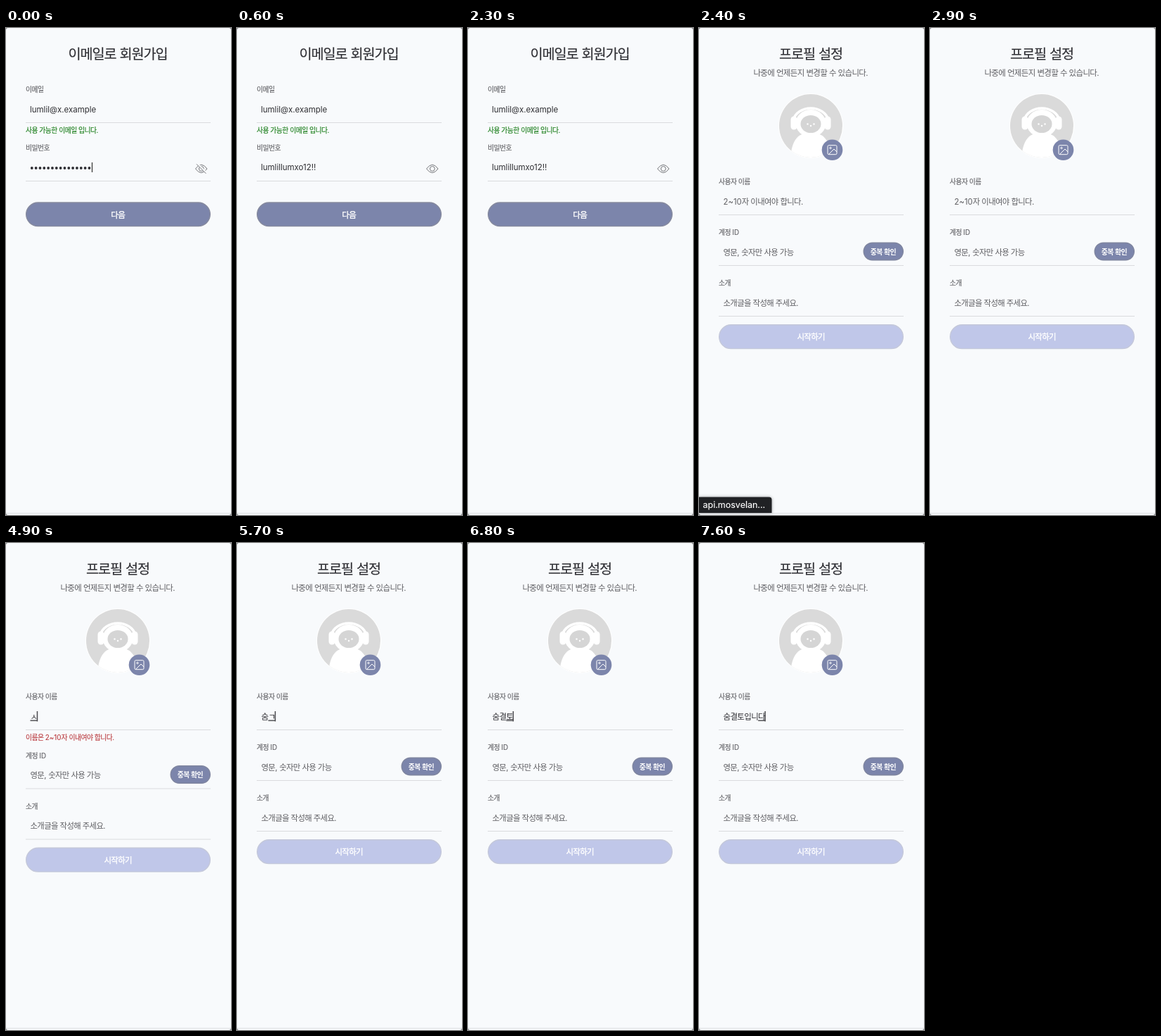
Animation of 320 by 692 pixels, one loop 8000 ms. Source, as an HTML page:

```html
<!DOCTYPE html>
<html lang="ko">
<head>
<meta charset="utf-8">
<title>회원가입</title>
<style>
html, body { margin: 0; width: 100%; height: 100%; overflow: hidden; background: #f8fafc; }
svg { display: block; width: 320px; height: 692px; }
text { font-family: Inter, "Noto Sans CJK KR", "Noto Sans CJK", sans-serif; white-space: pre; word-spacing: -.04em; }
.ko { letter-spacing: -.056em; }
.title { font-size: 19.7px; fill: #2e2e33; stroke: #2e2e33; stroke-width: .15px; text-anchor: middle; }
.body { font-size: 11.48px; fill: #2e2e32; }
.hint { font-size: 11.38px; fill: #5e5e62; }
.sub { font-size: 11.48px; fill: #5e5e62; text-anchor: middle; }
.label { font-size: 9.8px; fill: #646468; stroke: #646468; stroke-width: .15px; }
.ok { font-size: 9.84px; fill: #1c7f1c; stroke: #1c7f1c; stroke-width: .15px; }
.bad { font-size: 9.84px; fill: #b9383c; stroke: #b9383c; stroke-width: .1px; }
.btn { font-size: 11.48px; font-weight: 500; fill: #fff; stroke: #fff; stroke-width: .35px; text-anchor: middle; }
.small { font-size: 9.95px; font-weight: 700; fill: #fff; text-anchor: middle; }
.tip { font-size: 12.5px; fill: #fff; stroke: #fff; stroke-width: .15px; }
#tip { filter: drop-shadow(0 0 2px rgba(0, 0, 0, .35)); }
</style>
</head>
<body>
<svg id="stage" viewBox="0 0 320 692" xmlns="http://www.w3.org/2000/svg">
  <rect width="320" height="692" fill="#7d7f82"/>
  <rect width="320" height="692" rx="3" fill="#f8fafc"/>
  <path d="M0 689.5H320" stroke="#dcdee1"/>

  <g id="signup">
    <g id="dots" fill="#2e2e33"></g>
    <path id="pwCaret" d="M122.5 191V205" stroke="#444" stroke-width="1.4"/>
    <g fill="none" stroke="#75767a">
      <path d="M269.5 200Q277.8 188.6 286 200Q277.8 211.4 269.5 200Z"/>
      <circle cx="277.8" cy="200" r="3.4"/>
      <g id="slash">
        <path d="M272 193L285 206" stroke="#f8fafc" stroke-width="2.6"/>
        <path d="M271 193.4L284.4 206.8"/>
      </g>
    </g>
  </g>

  <g id="profile">
    <clipPath id="round"><circle cx="159" cy="139" r="45"/></clipPath>
    <circle cx="159" cy="139" r="46" fill="#fff"/>
    <circle cx="159" cy="139" r="45" fill="#dadada"/>
    <g clip-path="url(#round)" fill="#fff">
      <path d="M130 186C131 165 138 152 150 150H168C180 152 187 165 188 186Z"/>
      <path d="M134.5 130A25 20 0 0 1 183.5 130" fill="none" stroke="#fff" stroke-width="3.6"/>
      <rect x="130.5" y="125.5" width="9" height="19" rx="4.5"/>
      <rect x="178.5" y="125.5" width="9" height="19" rx="4.5"/>
      <ellipse cx="159" cy="135.5" rx="21.5" ry="19.5"/>
      <ellipse cx="159" cy="136.5" rx="14.5" ry="12.6" fill="#d5d5d5"/>
      <circle cx="154.5" cy="136.5" r="1.2"/>
      <circle cx="163.5" cy="136.5" r="1.2"/>
      <circle cx="159" cy="139" r="1.2"/>
    </g>
    <circle cx="189.5" cy="173.2" r="14.8" fill="#7c85ab"/>
    <g fill="none" stroke="#fff" stroke-linejoin="round">
      <rect x="183" y="166.7" width="13" height="13" rx="1.6"/>
      <circle cx="187" cy="170.5" r="1.2"/>
      <path d="M184.4 179.5L192 172L196 176"/>
    </g>
    <g id="error"></g>
    <g id="lower"></g>
    <rect id="under" y="251.5" width="10" height="1.6" fill="#5a5a5e"/>
    <rect id="caret" y="239" width="1.5" height="14.5" fill="#4c4c50"/>
  </g>

  <g id="tip">
    <path d="M0 666.5H99.5Q103.5 666.5 103.5 670.5V689H0Z" fill="#202124"/>
  </g>
</svg>
<script>
const LOOP = 8000, LEFT = 34.5, STEP = 9.92, SHIFT = 11.5;
const REVEAL = 100, NEXT = 2400, FADE = 2500, FOCUS = 3700, INVALID = 4900, VALID = 5600;
const TYPED = [
  [4900, 'ㅅ'], [5100, '수'], [5400, '숨'], [5600, '숨ㄱ'], [5900, '숨겨'],
  [6100, '숨결'], [6300, '숨결ㅌ'], [6800, '숨결토'], [7000, '숨결통'],
  [7100, '숨결토이'], [7300, '숨결토입'], [7400, '숨결토입ㄴ'],
  [7500, '숨결토입니'], [7600, '숨결토입니다']
];

const $ = id => document.getElementById(id);

function add(parent, tag, attrs) {
  const el = document.createElementNS('http://www.w3.org/2000/svg', tag);
  for (const k in attrs) el.setAttribute(k, attrs[k]);
  return parent.appendChild(el);
}

// Hangul runs are set tighter than Latin ones.
function write(el, str) {
  el.replaceChildren();
  for (const run of str.match(/[ -~]+|[^ -~]+/g) || []) {
    add(el, 'tspan', /[ -~]/.test(run[0]) ? {} : { class: 'ko' }).textContent = run;
  }
}

function label(parent, cls, x, y, str) {
  const el = add(parent, 'text', { class: cls, x, y });
  write(el, str);
  return el;
}

const rule = (parent, y) => add(parent, 'path', { d: `M28 ${y}H291`, stroke: '#dadbde' });

function pill(parent, x, y, h, fill, edge, cls, str) {
  const w = 291 - x, line = 1.4;
  add(parent, 'rect', {
    x: x + line / 2, y: y + line / 2, width: w - line, height: h - line,
    rx: (h - line) / 2, fill, stroke: edge, 'stroke-width': line
  });
  label(parent, cls, x + w / 2 - .3, y + h / 2 + (cls === 'btn' ? 4.8 : 4.3), str);
}

const signup = $('signup'), profile = $('profile'), lower = $('lower');

label(signup, 'title', 159, 44.1, '이메일로 회원가입');
label(signup, 'label', 28, 90.6, '이메일');
label(signup, 'body', 34, 119.7, 'lumlil@x.example');
rule(signup, 134.5);
label(signup, 'ok', 28, 149.4, '사용 가능한 이메일 입니다.');
label(signup, 'label', 28, 174.2, '비밀번호');
const password = label(signup, 'body', 34, 202.4, 'lumlillumxo12!!');
rule(signup, 217.5);
pill(signup, 28, 247.3, 35, '#7c85ab', '#868a9e', 'btn', '다음');
for (let i = 0; i < 15; i++) add($('dots'), 'circle', { cx: 36.8 + i * 5.83, cy: 199, r: 1.9 });

label(profile, 'title', 159, 44.1, '프로필 설정');
label(profile, 'sub', 159, 67.7, '나중에 언제든지 변경할 수 있습니다.');
label(profile, 'label', 28, 222.2, '사용자 이름');
const nameHint = label(profile, 'hint', LEFT, 250.6, '2~10자 이내여야 합니다.');
const nameText = label(profile, 'body', LEFT, 250.6, '');
rule(profile, 265.5);
label($('error'), 'bad', 28, 279.8, '이름은 2~10자 이내여야 합니다.');

label(lower, 'label', 28, 294.2, '계정 ID');
label(lower, 'hint', LEFT, 322.5, '영문, 숫자만 사용 가능');
rule(lower, 337.5);
pill(lower, 233.5, 304.5, 26, '#7c85ab', '#7f859f', 'small', '중복 확인');
label(lower, 'label', 28, 366.2, '소개');
label(lower, 'hint', LEFT, 394.5, '소개글을 작성해 주세요.');
rule(lower, 409.5);
pill(lower, 28, 421, 35.3, '#c0c7e9', '#c4c8da', 'btn', '시작하기');

label($('tip'), 'tip', 5.5, 682.3, 'api.mosvelan...');

const show = (el, on) => el.setAttribute('visibility', on ? 'inherit' : 'hidden');
const page = (el, on) => { el.style.display = on ? '' : 'none'; };
let shown = '';

function draw(t) {
  const onProfile = t >= NEXT, open = t >= REVEAL;
  page(signup, !onProfile);
  page(profile, onProfile);
  show($('dots'), !open);
  show($('pwCaret'), !open);
  show($('slash'), !open);
  show(password, open);

  const fade = Math.max(0, Math.floor((t - FADE) / 100));
  $('tip').setAttribute('opacity', onProfile ? Math.max(0, 1 - fade / 4) : 0);

  const invalid = t >= INVALID && t < VALID;
  show($('error'), invalid);
  lower.setAttribute('transform', `translate(0 ${invalid ? SHIFT : 0})`);

  const str = TYPED.reduce((s, [at, v]) => t >= at ? v : s, '');
  if (str !== shown) write(nameText, shown = str);
  show(nameHint, !str);
  show($('under'), str);
  show($('caret'), t >= FOCUS);
  const end = LEFT + STEP * str.length;
  $('under').setAttribute('x', end - STEP);
  $('caret').setAttribute('x', end - .7);
}

const start = performance.now();
function tick() {
  draw((performance.now() - start) % LOOP);
  requestAnimationFrame(tick);
}
tick();
</script>
</body>
</html>
```
